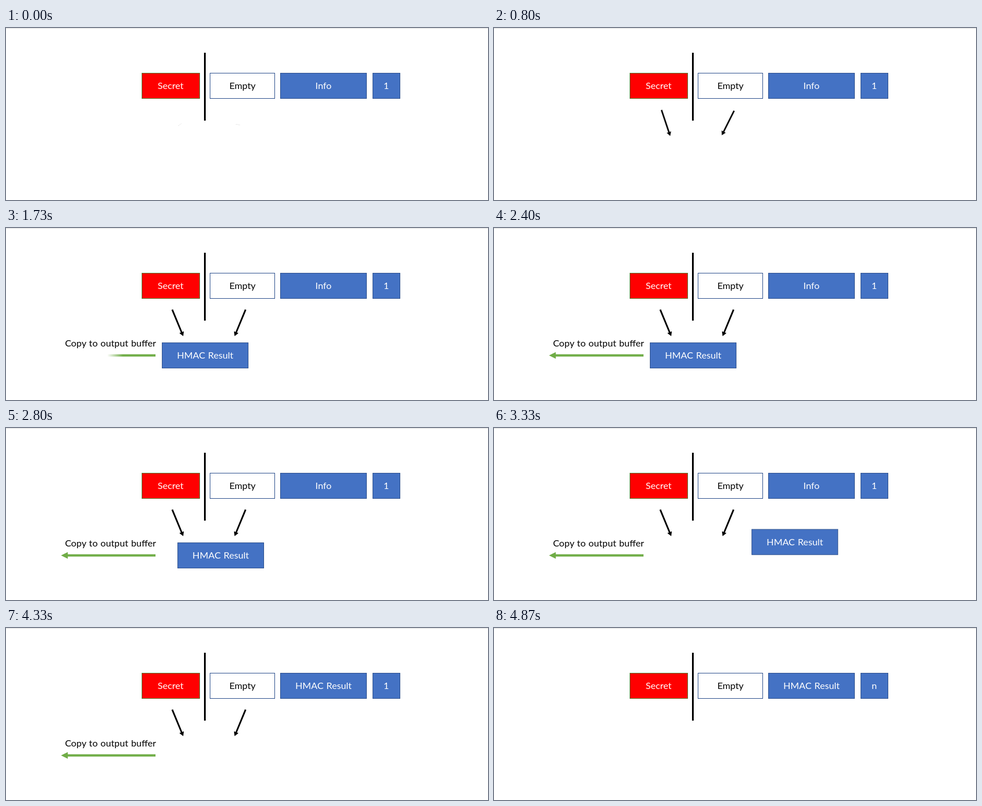
Recreate the animation shown at these times as an HTML page. Size 835x299 px, loop 4940 ms.

```html
<!DOCTYPE html>
<html lang="en">
<head>
<meta charset="utf-8">
<title>HMAC expand step</title>
<style>
  html, body { margin: 0; height: 100%; overflow: hidden; background: #fff; }
  svg { display: block; width: 100%; height: 100%; }
  text { font: 16.2px Lato, sans-serif; word-spacing: .9px; }
  .mid { text-anchor: middle; fill: #fff; }
  .box { fill: #4472c4; stroke: #2f528f; }
</style>
</head>
<body>
<svg viewBox="0 0 835 299">
  <defs>
    <linearGradient id="wipe" gradientUnits="userSpaceOnUse" y1="0" y2="0">
      <stop offset="0" stop-color="#70ad47" stop-opacity="0"/>
      <stop offset="1" stop-color="#70ad47"/>
    </linearGradient>
    <path id="route" d="M0 0H102.5C148.4 0 205-33.4 205-60.5V-121"/>
    <path id="arrow" d="M-25-1.4H17.5V-4.2L25 0L17.5 4.2V1.4H-25Z"/>
  </defs>

  <rect width="835" height="1" fill="#e1e1e1"/>
  <rect x="343" y="43" width="3" height="118"/>

  <rect x="235.5" y="78.5" width="100" height="44" fill="red" stroke="#507e32"/>
  <text class="mid" x="285.2" y="106.4">Secret</text>
  <rect x="353.5" y="78.5" width="112" height="44" fill="#fff" stroke="#2f528f"/>
  <text class="mid" x="409.7" y="106.4" style="fill:#000">Empty</text>
  <rect class="box" x="475.5" y="78.5" width="149" height="44"/>
  <text class="mid" x="550" y="106.4">Info</text>
  <rect class="box" x="635.5" y="78.5" width="47" height="44"/>
  <text class="mid" x="658.7" y="106.4">1</text>
  <g id="counter">
    <rect class="box" x="635.5" y="78.5" width="47" height="44"/>
    <text class="mid" x="658.7" y="106.4">n</text>
  </g>

  <use id="left" href="#arrow"/>
  <use id="right" href="#arrow"/>

  <g id="copy">
    <text x="102.2" y="206">Copy to output buffer</text>
    <path fill="url(#wipe)" d="M259 219.6H107V215.8L95.3 221.5L107 227.2V223.4H259Z"/>
  </g>

  <g id="result">
    <rect class="box" x="-74.5" y="-22" width="149" height="44"/>
    <text class="mid" y="5.9">HMAC Result</text>
  </g>
</svg>
<script>
const LOOP = 4940, STEP = 200 / 3, LAST_STEP = 73;
const el = id => document.getElementById(id);
const progress = (t, start, duration) => Math.min(1, Math.max(0, (t - start) / duration));

// Time in ms and share of the route travelled
const travelKeys = [[2345, 0], [2670, .0345], [2800, .093], [3200, .479],
                    [3330, .62], [3730, .893], [3800, .917], [4345, 1]];

function slope(a, b) {
  return (b[1] - a[1]) / (b[0] - a[0]);
}

function tangent(keys, i) {
  const before = keys[i - 1], here = keys[i], after = keys[i + 1];
  if (!before || !after) return 0;
  const h1 = here[0] - before[0], h2 = after[0] - here[0];
  return (h1 * slope(here, after) + h2 * slope(before, here)) / (h1 + h2);
}

// Cubic Hermite interpolation through the keys
function interpolate(keys, t) {
  if (t <= keys[0][0]) return keys[0][1];
  const i = keys.findIndex(key => t < key[0]);
  if (i < 0) return keys[keys.length - 1][1];
  const [t0, v0] = keys[i - 1], [t1, v1] = keys[i];
  const h = t1 - t0, u = (t - t0) / h, w = 1 - u;
  return v0 * (1 + 2 * u) * w * w + v1 * u * u * (3 - 2 * u)
    + h * u * w * (tangent(keys, i - 1) * w - tangent(keys, i) * u);
}

const route = el('route'), routeLength = route.getTotalLength();

function growAndTurn(id, x, angle, drift, p, opacity) {
  const rest = 1 - p;
  el(id).setAttribute('transform',
    `translate(${x + drift * rest} ${165 + 3.5 * rest}) rotate(${angle + 90 * rest}) scale(${p})`);
  el(id).setAttribute('opacity', p * opacity);
}

function draw(t) {
  const fade = progress(t, 4345, 500);
  const grow = progress(t, -155, 1000);
  growAndTurn('left', 297.5, 67.5, 4.5, grow, 1 - fade);
  growAndTurn('right', 405.5, 112.5, -4.5, grow, 1 - fade);

  const zoom = progress(t, 845, 500);
  const at = route.getPointAtLength(interpolate(travelKeys, t) * routeLength);
  el('result').setAttribute('transform', `translate(${345 + at.x} ${221.5 + at.y}) scale(${zoom})`);
  el('result').setAttribute('opacity', zoom);

  const edge = 250 - 192 * progress(t, 1345, 1000);
  el('wipe').setAttribute('x1', edge);
  el('wipe').setAttribute('x2', edge + 27);
  el('copy').setAttribute('opacity', t < 1345 ? 0 : 1 - fade);
  el('counter').setAttribute('opacity', fade);
}

const start = performance.now();
function tick() {
  const t = (performance.now() - start) % LOOP;
  draw(Math.min(LAST_STEP, Math.floor((t + 4) / STEP)) * STEP);
  requestAnimationFrame(tick);
}
tick();
</script>
</body>
</html>
```
